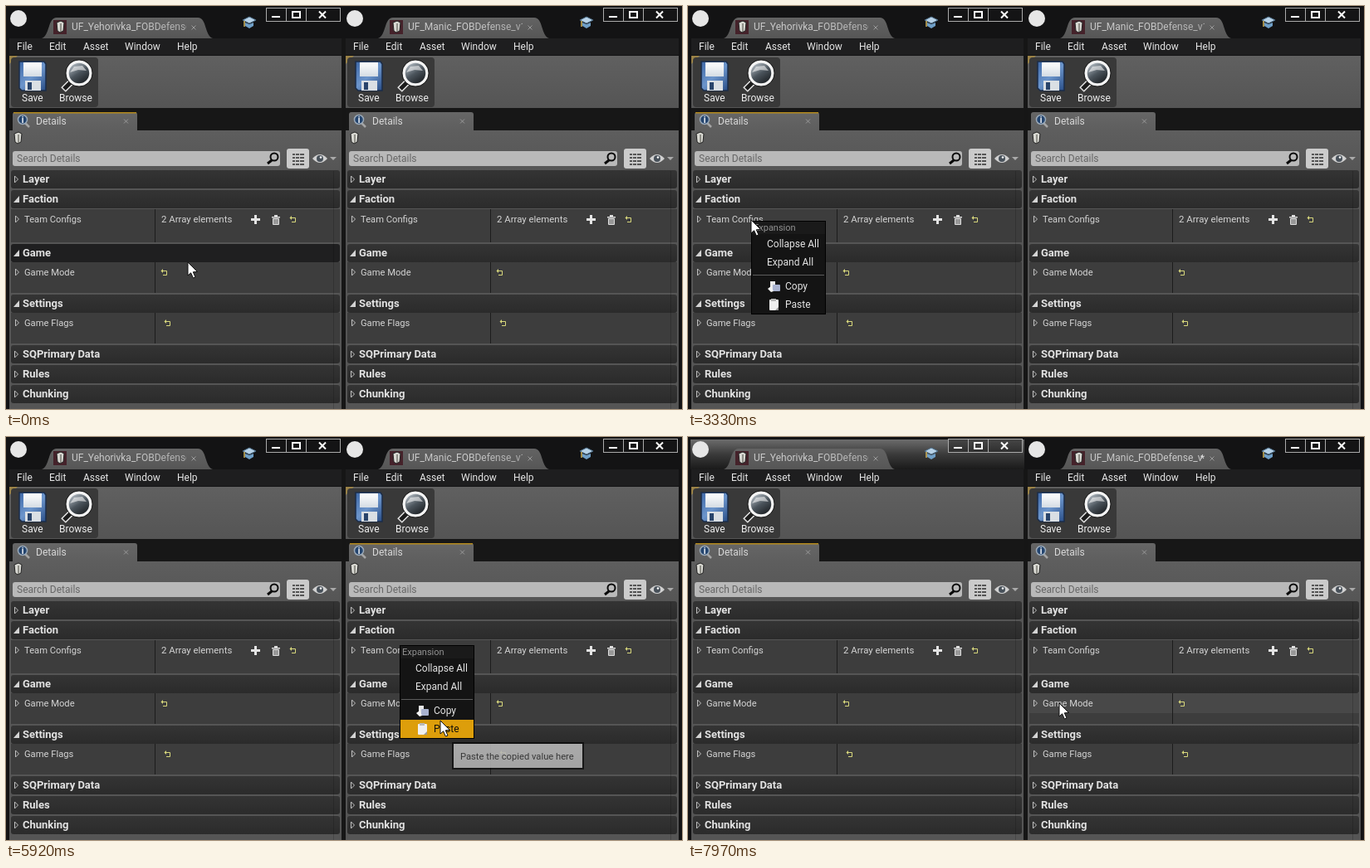
An HTML page with a canvas that plays this animation: 814 by 486 pixels, repeating every 8 s.

```html
<!DOCTYPE html>
<html>
<head>
<meta charset="utf-8">
<style>
html, body { margin: 0; width: 100%; height: 100%; overflow: hidden; background: #131314; }
canvas { display: block; }
</style>
</head>
<body>
<canvas id="stage" width="814" height="486"></canvas>
<script>
const g = document.getElementById('stage').getContext('2d');
const LOOP = 8000, STEP = 66.38;
const ORANGE = '#dd9e0b', LIGHT = '#d4d4d4', YELLOW = '#d8d87c';

// Pointer keys: step, x, y
const path = [
  [13, 219, 310], [18, 130, 150], [22, 86, 86], [23, 80, 76], [24, 66, 39], [25, 47, 43],
  [26, 46, 45], [29, 206, 56], [30, 125, 50], [32, 112, 50], [33, 206, 58],
  [34, 310, 58], [35, 185, 46], [36, 155, 46], [38, 155, 46], [39, 237, 41], [42, 336, 110],
  [46, 160, 235], [48, 66, 257], [49, 76, 259], [53, 76, 259], [57, 110, 333], [60, 118, 340],
  [62, 118, 341], [66, 130, 331], [72, 475, 251], [77, 475, 251], [84, 520, 338], [86, 523, 343],
  [92, 523, 343], [100, 60, 322], [101, 43, 316], [106, 43, 316], [111, 86, 392], [113, 88, 393],
  [119, 437, 329], [120, 447, 322]
];
const menus = [
  { from: 50, to: 63, x: 76, y: 259, w: 90, h: 113 },
  { from: 77, to: 93, x: 474, y: 251, w: 90, h: 113 },
  { from: 102, to: 113, x: 43, y: 316, w: 139, h: 142 }
];
const barItems = [['File', 4, 13], ['Edit', 42, 52], ['Asset', 83, 93], ['Window', 133, 143], ['Help', 196, 206], ['', 240]];
const headers = [['Layer', 198], ['Faction', 222, 1], ['Game', 287, 1], ['Settings', 348, 1], ['SQPrimary Data', 409], ['Rules', 433], ['Chunking', 457]];
const rows = [['Team Configs', 245, 285, 345], ['Game Mode', 309, 346, 190], ['Game Flags', 370, 407, 194]];

function pointer(k) {
  const i = path.findIndex(p => p[0] >= k);
  if (i < 1) return path[0].slice(1);
  const [a, ax, ay] = path[i - 1], [b, bx, by] = path[i], u = (k - a) / (b - a);
  return [Math.round(ax + (bx - ax) * u), Math.round(ay + (by - ay) * u)];
}
function rect(x, y, w, h, fill, r = 0) {
  g.fillStyle = fill;
  g.beginPath(); g.roundRect(x, y, w, h, r); g.fill();
}
function frame(x, y, w, h, color) {
  g.strokeStyle = color; g.lineWidth = 1;
  g.strokeRect(x + .5, y + .5, w - 1, h - 1);
}
function text(s, x, y, color = LIGHT, size = 12, weight = '') {
  g.font = `${weight} ${size}px Roboto, sans-serif`;
  g.fillStyle = color; g.fillText(s, x, y);
}
function poly(points, fill, stroke, width = 1) {
  g.beginPath();
  for (let i = 0; i < points.length; i += 2) g.lineTo(points[i], points[i + 1]);
  g.closePath();
  if (fill) { g.fillStyle = fill; g.fill(); }
  if (stroke) { g.strokeStyle = stroke; g.lineWidth = width; g.stroke(); }
}
function line(x1, y1, x2, y2, color, width = 1) {
  g.strokeStyle = color; g.lineWidth = width;
  g.beginPath(); g.moveTo(x1, y1); g.lineTo(x2, y2); g.stroke();
}
function circle(x, y, r, fill, stroke, width) {
  g.beginPath(); g.arc(x, y, r, 0, 7);
  if (fill) { g.fillStyle = fill; g.fill(); }
  if (stroke) { g.strokeStyle = stroke; g.lineWidth = width; g.stroke(); }
}
function shade(x1, y1, x2, y2, ...colors) {
  const s = g.createLinearGradient(x1, y1, x2, y2);
  colors.forEach((c, i) => s.addColorStop(i / (colors.length - 1), c));
  return s;
}
function cross(x, y, r, color, width) {
  line(x - r, y - r, x + r, y + r, color, width);
  line(x - r, y + r, x + r, y - r, color, width);
}
function pillar(x, y) {
  poly([x - 4, y - 5, x + 1, y - 7, x + 5, y - 5, x + 4, y + 5, x, y + 7, x - 3, y + 5], '#d8d8d2', '#222');
  line(x + 1, y - 4, x + 1, y + 6, '#77776f', 1.5);
}
function expander(x, y, open) {
  if (open) poly([x, y + 4, x + 7, y + 4, x + 7, y - 4], LIGHT);
  else poly([x + 1.5, y - 4, x + 5.5, y, x + 1.5, y + 4], null, '#c0c0c0');
}
function revert(x, y) {
  g.strokeStyle = YELLOW; g.lineWidth = 1;
  g.beginPath();
  g.moveTo(x - 2, y - 1.5); g.lineTo(x + 3.5, y - 1.5); g.lineTo(x + 3.5, y + 3.5); g.lineTo(x - 1, y + 3.5);
  g.stroke();
  poly([x - 3.5, y - 1.5, x - 1, y - 4, x - 1, y + 1], YELLOW);
}

function toolbar(o, hot) {
  rect(4 + o, 60, 400 + (o && 1), 63, shade(0, 60, 0, 122, '#606060', '#555'));
  poly([4 + o, 60, 14 + o, 60, 4 + o, 70], '#9a8247');
  rect(6 + o, 62, 105, 60, '#393939', 4);
  if (hot) rect(62 + o, 62, 46, 59, ORANGE, 2);
  text('Save', 19 + o, 115, '#eee');
  text('Browse', 64 + o, 115, '#eee');
  // Floppy disk
  poly([16 + o, 67, 46 + o, 67, 48 + o, 70, 48 + o, 102, 19 + o, 102, 16 + o, 99], shade(16 + o, 67, 48 + o, 102, '#3f69a8', '#6c95cb', '#294d86'), '#1b2c48', 1.5);
  rect(21 + o, 68, 22, 17, shade(0, 68, 0, 85, '#fff', '#d4dce4'));
  rect(23 + o, 90, 19, 12, '#dadfe4');
  rect(26 + o, 92, 5, 9, '#29446b');
  // Magnifier
  line(79 + o, 91, 69 + o, 101, '#e4e4e4', 8);
  line(79 + o, 91, 70 + o, 100, '#1c1c1c', 5);
  circle(88 + o, 81, 14, shade(78 + o, 68, 96 + o, 95, '#c3ccd4', '#4b545c', '#15181b'), '#f4f4f4', 3.5);
  circle(88 + o, 81, 16.2, null, '#1a1a1a', 1);
  poly([77 + o, 80, 82 + o, 73, 92 + o, 72, 97 + o, 78, 87 + o, 77], 'rgba(255,255,255,.55)');
}

function titleBar(o, r, title, active, starred) {
  if (active) rect(3 + o, 3, 402 + r - o, 36, shade(0, 3, 0, 39, '#6c6c6c', '#3a3a3a', '#1a1a1a'));
  circle(15 + o, 15, 10, '#e6e6e6');
  g.beginPath();
  g.moveTo(43 + o, 39);
  g.bezierCurveTo(53 + o, 36, 50 + o, 14, 61 + o, 14);
  g.lineTo(231 + o, 14);
  g.bezierCurveTo(242 + o, 14, 239 + o, 36, 249 + o, 39);
  g.fillStyle = shade(0, 14, 0, 39, '#636363', '#565656'); g.fill();
  rect(57 + o, 17, 16, 17, '#45222a');
  pillar(65 + o, 25);
  g.save();
  g.beginPath(); g.rect(79 + o, 14, 138, 24); g.clip();
  if (starred) {
    text(title.slice(0, -1), 79 + o, 29, '#c9c9c9');
    text('*', 212 + o, 30, '#ddd');
  } else text(title, 79 + o, 29, shade(79 + o, 0, 217 + o, 0, '#c9c9c9', '#c9c9c9', '#aaa'));
  g.restore();
  cross(226 + o, 26, 2.5, '#999');
  // Mortarboard
  poly([285 + r, 17, 293 + r, 13, 301 + r, 17, 293 + r, 21], '#b8d3e8', '#496984');
  poly([288 + r, 20, 293 + r, 22, 298 + r, 20, 298 + r, 24, 293 + r, 27, 288 + r, 24], '#6f9fc7');
  line(287 + r, 18, 287 + r, 25, '#d2b45a', 1.5);
  // Window buttons
  for (const [x, w] of [[313, 25], [337, 25], [361, 42]]) {
    rect(x + r, 2, w, 17, 'rgba(23,23,23,.45)');
    frame(x + r, 2, w, 17, '#aaa');
  }
  rect(320 + r, 12, 10, 2, '#fff');
  g.strokeStyle = '#fff'; g.lineWidth = 2;
  g.strokeRect(345 + r, 7, 9, 7);
  cross(381 + r, 10.5, 4, '#fff', 2);
}

function searchBar(o, r) {
  rect(8 + o, 175, 322 + r - o, 18, '#b9b9b9', 3);
  text('Search Details', 13 + o, 188, '#666');
  circle(323 + r, 182, 4.5, null, '#0a0a0a', 2);
  line(320 + r, 186, 315 + r, 190, '#0a0a0a', 3);
  rect(338 + r, 172, 27, 24, '#cbcbcb', 3);
  for (let y = 178; y < 192; y += 4) {
    rect(345 + r, y, 3, 2, '#555');
    rect(349 + r, y, 4, 2, '#555');
    rect(354 + r, y, 5, 2, '#555');
  }
  g.beginPath();
  g.moveTo(369 + r, 184); g.quadraticCurveTo(378 + r, 174, 387 + r, 184);
  g.quadraticCurveTo(378 + r, 194, 369 + r, 184);
  g.fillStyle = '#d0d0d0'; g.fill();
  circle(378 + r, 184, 4, '#48515a');
  circle(379 + r, 182.5, 1.3, '#fff');
  poly([390 + r, 182, 398 + r, 182, 394 + r, 186], '#aaa');
}

function details(o, m, r, hit) {
  const w = 397 + r - o;
  for (const [name, y, open] of headers) {
    const hot = hit(6 + o, y, w, 24);
    rect(6 + o, y, w - 1, 22, hot ? '#1f1f20' : shade(0, y, 0, y + 22, '#343434', '#2b2b2b'), 3);
    expander(9 + o, y + 11, open);
    text(name, 20 + o, y + 15, '#e2e2e2', 13, 'bold');
  }
  rows.forEach(([name, y, end, arrow], i) => {
    rect(6 + o, y, w - 1, end - y, '#3d3d3d');
    if (hit(6 + o, y + 2, w, 23)) rect(6 + o, y, w - 1, 24, '#484848');
    rect(179 + m, y, 1, end - y, '#1c1c1c');
    expander(10 + o, y + 12, false);
    text(name, 22 + o, y + 16, LIGHT, 11.2);
    revert(arrow + m, y + 12);
    if (i) return;
    text('2 Array elements', 187 + m, y + 16, LIGHT, 11.4);
    rect(295 + m, 256, 11, 3, '#e4e4e4');
    rect(299 + m, 252, 3, 11, '#e4e4e4');
    rect(320 + m, 254, 10, 1.5, '#ddd');
    rect(323 + m, 252, 4, 2, '#ddd');
    rect(321 + m, 256, 8, 8, '#ddd', 1);
    for (const x of [323, 325, 327]) rect(x - .5 + m, 257, 1, 6, '#555');
  });
  rect(394 + r, 199, 1, 287, 'rgba(0,0,0,.18)');
}

function editor(right, title, focused, active, starred, hit) {
  const o = right ? 405 : 0, m = right ? 404 : 0, r = right ? 406 : 0;
  titleBar(o, r, title, active, starred);
  rect(4 + o, 39, 400 + r - o, 20, '#1e1e1f');
  barItems.slice(0, -1).forEach(([name, x, tx], i) => {
    const w = barItems[i + 1][1] - x;
    if (hit(x + o, 39, w, 20)) rect(x + o, 39, w, 20, ORANGE);
    text(name, tx + o, 53, '#e6e6e6');
  });
  toolbar(o, hit(62 + o, 62, 46, 59));
  rect(4 + o, 123, 400 + r - o, 27, '#171717');
  rect(4 + o, 150, 400 + r - o, 336, shade(0, 150, 0, 200, '#5e5e5e', '#555'));
  rect(8 + o, 128, 150, 23, shade(0, 128, 0, 150, '#666', '#5e5e5e'), [3, 3, 0, 0]);
  if (focused) rect(9 + o, 128, 148, 1.5, '#b48a1c');
  line(23 + o, 141, 28 + o, 146, '#a5a5a5', 2.5);
  circle(20 + o, 137, 5.5, '#24456f', '#9aa9b8', 1.5);
  text('i', 18.7 + o, 141, '#fff', 10, 'bold');
  text('Details', 36 + o, 143, '#d8d8d8');
  cross(144.5 + o, 139, 2.5, '#999');
  pillar(14 + o, 159);
  searchBar(o, r);
  details(o, m, r, hit);
}

function copyIcon(x, y) {
  poly([x + 3, y - 6, x + 9, y - 6, x + 9, y + 4, x + 3, y + 4], '#e9e9e9');
  rect(x + 6, y - 2, 9, 8, '#a9b2cf', 1);
  poly([x, y + 3, x + 4, y, x + 7, y + 6, x + 4, y + 7], '#f4f4f4');
}
function pasteIcon(x, y) {
  rect(x + 2, y - 6, 11, 13, '#f0f0f0', 1);
  rect(x + 4, y - 7, 6, 3, '#b9b9b9');
  poly([x + 13, y + 3, x + 13, y + 7, x + 9, y + 7], '#999');
}
function contextMenu({ x, y, w, h }, hit) {
  rect(x, y, w, h, '#000');
  rect(x + 1, y + 1, w - 2, h - 2, '#141414');
  rect(x + 1, y + 1, w - 2, 15, '#1a1a1a');
  text('Expansion', x + 3, y + 12, '#929292', 11);
  const item = (name, cy, tx, icon) => {
    const hot = hit(x, y + cy - 11, w, 22);
    if (hot) rect(x + 1, y + cy - 11, w - 2, 22, ORANGE);
    if (icon) icon(x + 20, y + cy);
    text(name, x + tx, y + cy + 4, hot ? '#15120a' : '#e4e4e4');
  };
  item('Collapse All', 28, 19);
  item('Expand All', 50, 19);
  rect(x + 2, y + 65, w - 4, 1, '#5c5c5c');
  item('Copy', 79, 41, copyIcon);
  item('Paste', 101, 41, pasteIcon);
  if (h > 120) {
    rect(x + 2, y + 116, w - 4, 1, '#5c5c5c');
    item('Find Row References', 130, 19);
  }
}
function tooltip(s, x, y, w, h, size, alpha) {
  g.globalAlpha = alpha;
  rect(x, y, w, h, '#050505');
  rect(x + 2, y + 2, w - 4, h - 4, shade(0, y, 0, y + h, '#f4f4f4', '#e8e8e8'));
  text(s, x + 10, y + h / 2 + 4, '#000', size);
  g.globalAlpha = 1;
}

function draw(k) {
  const [px, py] = pointer(k - 1), [x, y] = pointer(k);
  const menu = menus.find(m => k >= m.from && k < m.to);
  const inside = (l, t, w, h) => px >= l && px < l + w && py >= t && py < t + h;
  const hit = menu ? () => false : inside;
  const rightFocus = k >= 77 && k < 102;
  // A window's title bar lights up once its first menu has closed
  const active = !menu && k >= menus[0].to;
  rect(0, 0, 814, 486, '#131314');
  editor(false, 'UF_Yehorivka_FOBDefense_v1', !rightFocus, active && !rightFocus, false, hit);
  editor(true, 'UF_Manic_FOBDefense_v1', rightFocus, active && rightFocus, k >= 93, hit);
  rect(404, 39, 5, 447, '#161616');
  if (menu) contextMenu(menu, inside);
  if (k === 24 || k === 25)
    tooltip('Browses to the associated asset and selects it in the most recently used Content Browser (summoning one if necessary) (Ctrl+B)', 76, 62, 709, 35, 12, 1);
  if (k >= 89 && k < 93)
    tooltip('Paste the copied value here', 537, 368, 159, 33, 11.2, k === 89 ? .67 : 1);
  g.save();
  g.translate(x, y - 1);
  poly([0, 0, 0, 16, 3.6, 12.8, 6.4, 19, 9, 18, 6.3, 11.8, 11.5, 11.5], '#fff', '#111');
  g.restore();
}

function tick(now) {
  draw(Math.floor(now % LOOP / STEP));
  requestAnimationFrame(tick);
}
requestAnimationFrame(tick);
</script>
</body>
</html>
```
